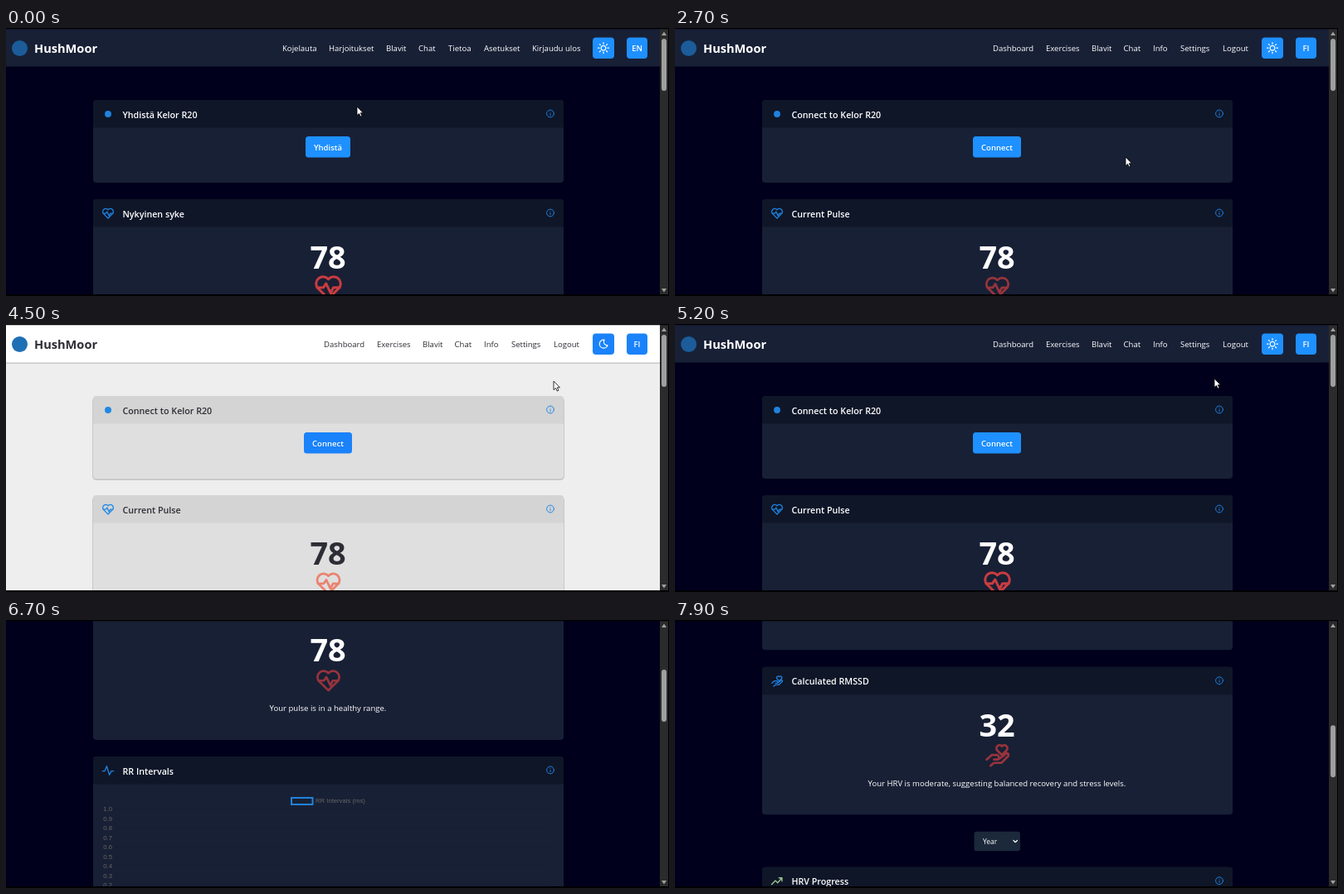
Write an HTML page that moves like this. It is 799 by 324 pixels and loops after 8 s.

```html
<!DOCTYPE html>
<html lang="en">
<head>
<meta charset="utf-8">
<title>Pulse dashboard</title>
<style>
  html, body { margin: 0; width: 100%; height: 100%; overflow: hidden; background: #000; }
  svg { display: block; font-family: "Open Sans", "Noto Sans", sans-serif; }
  svg {
    --page: #00001c; --bar: #182036; --head: #0f1628; --body: #182035;
    --ink: #fff; --blue: #1e90ff; --icon: #1f82e0; --logo: #1b5c99; --beat: #c93c40;
    --hover: #1c74d2; --glyph: #fff; --shade: 0;
  }
  svg.light {
    --page: #eee; --bar: #fff; --head: #d4d4d4; --body: #dfdfdf;
    --ink: #2d2d35; --blue: #1a82fa; --icon: #1e88e5; --logo: #1f6fb5; --beat: #ee6a50;
    --hover: #a5bcdb; --glyph: #2a62b0; --shade: .16;
  }
  text { fill: var(--ink); }
  .nav, .note { font-size: 9.55px; }
  .note, .count, .mid { text-anchor: middle; }
  .title { font-size: 10.7px; font-weight: 600; }
  .count { font-size: 37.8px; font-weight: 700; }
  .button { fill: var(--blue); }
  .label { font-size: 9.5px; font-weight: 600; fill: #fff; }
  .axis text { font: 7.7px "Liberation Sans", Arial, sans-serif; fill: #666; }
  .line { fill: none; stroke-width: 2; stroke-linecap: round; stroke-linejoin: round; }
  .icon { stroke: var(--icon); }
  .beat { stroke: var(--beat); }
</style>
</head>
<body>
<svg id="stage" width="799" height="324" viewBox="0 0 799 324">
  <rect id="page" width="799" height="324" fill="var(--page)"/>
  <g id="scroll"></g>
  <g id="scrollbar">
    <rect x="788" width="11" height="324" fill="#2b2b2b"/>
    <path d="M790 9L793 4.5 796 9ZM790 315L793 319.5 796 315Z" fill="#9f9f9f"/>
    <rect id="thumb" x="790" y="13" width="6" height="63" rx="3" fill="#9f9f9f"/>
  </g>
  <path d="M0 0H799V324H0V322H798V1.3H0Z" fill="#000"/>
  <g id="cursor" fill="#fff" stroke="#000" stroke-width=".8" stroke-linejoin="round">
    <path id="arrow" d="M0 0V10.6L2.5 8.4 4.2 12 5.9 11.2 4.3 7.7H7.4Z"/>
    <path id="hand" d="M-1.2 1Q0-.7 1.2 1V5L4.7 5.6Q6 6 5.8 7.4L5 12.5Q4.8 14 3.4 14H-.6L-4.4 9.2Q-4.4 7.6-2.8 8L-1.2 9Z"/>
  </g>
</svg>
<script>
const LOOP = 8000;
const CLICK = { language: 1300, light: 3300, dark: 4850 };
const $ = id => document.getElementById(id);

const words = {
  fi: { links: ["Kojelauta", "Harjoitukset", "Blavit", "Chat", "Tietoa", "Asetukset", "Kirjaudu ulos"],
        x: [333, 389, 458, 497, 533, 576, 634],
        device: "Yhdistä Kelor R20", connect: "Yhdistä", pulse: "Nykyinen syke", other: "EN", width: 54 },
  en: { links: ["Dashboard", "Exercises", "Blavit", "Chat", "Info", "Settings", "Logout"],
        x: [383, 447, 502, 540.5, 576, 609, 660],
        device: "Connect to Kelor R20", connect: "Connect", pulse: "Current Pulse", other: "FI", width: 58 }
};

const heart = "M0 9L-8.4 .6A5.4 5.4 0 0 1 0-6.4A5.4 5.4 0 0 1 8.4 .6Z";
const icons = {
  device: `<circle r="6" fill="var(--icon)" stroke="none"/>`,
  heart: `<path d="${heart}M-9 .2H-4L-1.8-3 1.8 4.5 4 .2H9"/>`,
  activity: `<path d="M-10 1H-6L-2.5-8 2.5 8 6 1H10"/>`,
  care: `<path d="${heart}" transform="translate(4 -4.5) scale(.5)" stroke-width="4"/>
    <path d="M-9.5 4L-5 0H0Q2.5 1.8 .5 4H-3M1.5 3.5L8-1.5Q10.5-1.5 9.6 1L3.5 7H-3L-6 9.5"/>`,
  trend: `<path d="M-10 6L-3-1 1 3 9-6M3.5-6H9V0" stroke="#9cc48c"/>`
};
const icon = (name, x, y, size, kind = "icon") =>
  `<g class="line ${kind}" transform="translate(${x} ${y}) scale(${size})">${icons[name]}</g>`;

const card = (y, height, name, title, content, id = "") => `
  <g transform="translate(0 ${y})">
    <rect x="104" y="1" width="569" height="${height + 1}" rx="5" opacity="var(--shade)"/>
    <rect x="105" width="567" height="${height}" rx="4" fill="var(--body)"/>
    <path d="M105 33.5V4Q105 0 109 0H668Q672 0 672 4V33.5Z" fill="var(--head)"/>
    ${icon(name, 123, 17, .66)}
    <text class="title" id="${id}" x="140.5" y="21.7">${title}</text>
    <g class="line icon" transform="translate(656 16.5)" stroke-width="1" style="stroke-width:1">
      <circle r="4.4"/><path d="M0 0V2M0-2V-1.9"/>
    </g>
    ${content}
  </g>`;

const reading = (count, name, note) => `
  <text class="count" x="388" y="84">${count}</text>
  <g transform="translate(388.5 106.5)"><g class="pulsing">${icon(name, 0, 0, 1.45, "beat")}</g></g>
  <text class="note" x="388" y="144">${note}</text>`;

function chart() {
  let out = `<rect x="344" y="50" width="25.5" height="8" fill="none" stroke="#2283dc" stroke-width="2"/>
    <text x="373" y="56.3">RR Intervals (ms)</text>`;
  for (let i = 0; i <= 10; i++) {
    const y = 63.5 + i * 11.5;
    const value = i === 10 ? "0" : (1 - i / 10).toFixed(1);
    out += `<path d="M131 ${y}H657" stroke="#000" stroke-opacity=".12" stroke-width=".7"/>
      <text x="128" y="${y + 2.7}" text-anchor="end">${value}</text>`;
  }
  return `<g class="axis">${out}</g>`;
}

function sun() {
  let rays = "";
  for (let i = 0; i < 8; i++)
    rays += `<path d="M0-5V-6.5" transform="rotate(${i * 45})"/>`;
  return `<g id="sun"><circle r="2.9"/>${rays}</g>`;
}

$("scroll").innerHTML = `
  <rect y="2" width="799" height="46" opacity="var(--shade)"/>
  <rect width="799" height="46.5" fill="var(--bar)"/>
  <circle cx="16.5" cy="24.5" r="9.5" fill="var(--logo)"/>
  <text x="34" y="30" font-size="14.6" font-weight="700">HushMoor</text>
  ${words.en.links.map(() => `<text class="nav" y="28.4"></text>`).join("")}
  <rect class="button" id="theme" x="707" y="11.5" width="26" height="25.5" rx="4"/>
  <g id="glyph" class="line" transform="translate(720 24.2)" style="stroke-width:1.2">
    ${sun()}<path id="moon" d="M1-5A5 5 0 1 0 5 1.5A4.2 4.2 0 0 1 1-5Z"/>
  </g>
  <rect class="button" id="language" x="748" y="11.5" width="25" height="25.5" rx="4"/>
  <text class="label mid" id="other" x="760.5" y="28.2"></text>
  ${card(87, 100, "device", "", `
    <rect class="button" id="connect" y="44" height="25.5" rx="3.5"/>
    <text class="label mid" id="connectText" x="388" y="60.8"></text>`, "device")}
  ${card(207, 178.5, "heart", "", reading(78, "heart", "Your pulse is in a healthy range."), "pulse")}
  ${card(405.5, 216, "activity", "RR Intervals", chart())}
  ${card(642, 178.5, "care", "Calculated RMSSD",
    reading(32, "care", "Your HRV is moderate, suggesting balanced recovery and stress levels."))}
  <rect x="360.5" y="841" width="55.5" height="23.5" rx="3" fill="#1b293b"/>
  <text x="371" y="856.2" font-size="8.5">Year</text>
  <path class="line" d="M408 851.8L410.2 854 412.4 851.8" stroke="#fff" style="stroke-width:1.2"/>
  ${card(884, 216, "trend", "HRV Progress", "")}`;

const links = [...document.querySelectorAll(".nav")];
const pulsing = [...document.querySelectorAll(".pulsing")];

// Each key is [time, ...values]
const pointer = [
  [0, 423, 95], [200, 430, 93], [950, 758, 22], [1600, 759, 23], [2300, 560, 150],
  [2700, 543, 156], [3150, 720, 18], [3550, 720, 18], [4050, 575, 140], [4250, 575, 140],
  [4700, 720, 19], [4950, 720, 19], [5200, 650, 66], [5700, 591, 90], [8000, 591, 90]
];
const scrolling = [[0, 0], [5800, 0], [6100, 70.5], [7300, 410], [7900, 585], [8000, 614]];

const smooth = k => k * k * (3 - 2 * k);
function sample(keys, t, ease = k => k) {
  const i = Math.max(1, keys.findIndex(key => key[0] >= t));
  const [a, b] = [keys[i - 1], keys[i]];
  const k = ease((t - a[0]) / (b[0] - a[0]));
  return a.slice(1).map((v, n) => v + (b[n + 1] - v) * k);
}

let spoken;
function setLanguage(name) {
  if (name === spoken) return;
  spoken = name;
  const w = words[name];
  links.forEach((link, i) => {
    link.textContent = w.links[i];
    link.setAttribute("x", w.x[i]);
  });
  $("device").textContent = w.device;
  $("pulse").textContent = w.pulse;
  $("connectText").textContent = w.connect;
  $("other").textContent = w.other;
  $("connect").setAttribute("x", 388 - w.width / 2);
  $("connect").setAttribute("width", w.width);
}

const show = (id, on) => $(id).style.display = on ? "" : "none";

function update(t) {
  const light = t >= CLICK.light && t < CLICK.dark;
  $("stage").setAttribute("class", light ? "light" : "");
  setLanguage(t < CLICK.language ? "fi" : "en");

  const [top] = sample(scrolling, t);
  $("scroll").setAttribute("transform", `translate(0 ${-top})`);
  $("thumb").setAttribute("y", 13 + top * .195);

  const beat = (1 + Math.cos(t / 1040 * 2 * Math.PI)) / 2;
  for (const g of pulsing) {
    g.setAttribute("transform", `scale(${.93 + .12 * beat})`);
    g.setAttribute("opacity", .7 + .3 * beat);
  }

  const [x, y] = sample(pointer, t, smooth);
  const over = (left, right) => y > 11 && y < 37 && x > left && x < right;
  const onTheme = over(707, 733), onLanguage = over(748, 773);
  $("theme").style.fill = onTheme ? "var(--hover)" : "";
  $("language").style.fill = onLanguage ? "var(--hover)" : "";
  $("glyph").style.stroke = onTheme ? "var(--glyph)" : "#fff";
  show("sun", !light);
  show("moon", light);
  show("hand", onTheme || onLanguage);
  show("arrow", !onTheme && !onLanguage);
  show("cursor", t < 6500);
  $("cursor").setAttribute("transform", `translate(${x} ${y})`);
}

const start = performance.now();
function tick() {
  update((performance.now() - start) % LOOP);
  requestAnimationFrame(tick);
}
tick();
</script>
</body>
</html>
```
